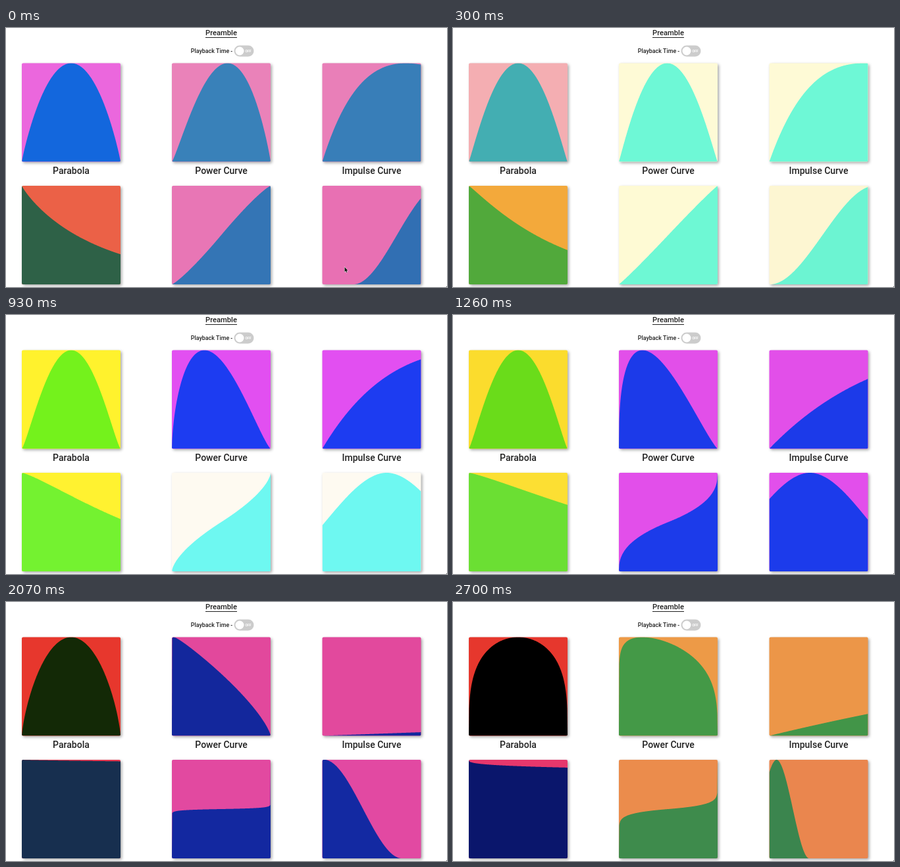
These frames come from a looping animation (670x394 px, 2730 ms). An HTML page with a canvas:

```html
<!DOCTYPE html>
<html lang="en">
<head>
<meta charset="utf-8">
<title>Shaping curves</title>
<style>
  html, body { margin: 0; width: 100%; height: 100%; overflow: hidden; background: #fff; }
  canvas { display: block; }
</style>
</head>
<body>
<canvas id="stage" width="670" height="394"></canvas>
<script>
const ctx = document.getElementById('stage').getContext('2d');
const LOOP = 2730, STEP = 30, SIZE = 150;
const { sin, cos, tan, pow, exp, abs, min, max } = Math;
const clamp = v => min(1, max(0, v));
const rgb = c => `rgb(${c.map(Math.round)})`;

// Shaping functions: x in 0..1, with two parameters a and b.
const parabola = (x, a, b) => pow(4 * x * (1 - x), b);
const power = (x, a, b) =>
  pow(a + b, a + b) / (pow(a, a) * pow(b, b)) * pow(x, a) * pow(1 - x, b);
const impulse = (x, a) => a * x * exp(1 - a * x);
const decay = (x, a, b) => exp(-a * pow(x, b));
const gain = (x, a) => {
  const half = 0.5 * pow(2 * min(x, 1 - x), a);
  return x < 0.5 ? half : 1 - half;
};
const pulse = (x, a, b) => {
  const d = min(1, abs(x - a) / b);
  return 1 - d * d * (3 - 2 * d);
};

// Palettes return [background, foreground] for a phase.
function warm(blue, greenFade) {
  return phase => {
    const s = clamp(sin(phase)), b = blue(phase);
    const g = max(242 * pow(s, 1.1), greenFade ? 0.2 * b : 0);
    const fade = greenFade ? 1 : 1 - pow(clamp(cos(phase)), 4);
    return [
      [230 + 25 * s * s, max(55, g), max(45, b)],
      [0.48 * g * fade, g, b]
    ];
  };
}
const sunset = warm(p => 235 * clamp(cos(p)) + 28 * clamp(sin(p)), false);
const forest = warm(p => 88 - 40 * sin(p), true);
const neon = phase => {
  const g = clamp(tan(phase));
  const b = 241 * pow((1 + sin(phase)) / 2, 0.85);
  return [
    [226 + 28 * g * g, max(60 + 0.08 * b, 250 * g), b],
    [max(0.12 * b, 110 * g), max(0.25 * b, 248 * g), b]
  ];
};

const panels = [
  { x: 24, y: 53.5, lag: 0, curve: parabola, palette: sunset, label: 'Parabola' },
  { x: 252, y: 53.5, lag: 0, curve: power, palette: neon, label: 'Power Curve' },
  { x: 480.5, y: 53.5, lag: 0.01, curve: impulse, palette: neon, label: 'Impulse Curve' },
  { x: 24, y: 240, lag: 0.03, curve: decay, palette: forest },
  { x: 252, y: 240, lag: 0.04, curve: gain, palette: neon },
  { x: 480.5, y: 240, lag: 0.06, curve: pulse, palette: neon }
];

function text(str, x, y, size, color = '#222', weight = 500) {
  ctx.font = `${weight} ${size}px Roboto, sans-serif`;
  ctx.textAlign = 'center';
  ctx.fillStyle = color;
  ctx.fillText(str, x, y);
}

function pill(x, y, w, h, r, color) {
  ctx.beginPath();
  ctx.roundRect(x, y, w, h, r);
  ctx.fillStyle = color;
  ctx.fill();
}

function drawPanel({ x, y, lag, curve, palette, label }, time) {
  const phase = 0.48 - lag + 1.19 * time;
  const a = 0.625 * (1 + cos(phase)), b = 0.625 * (1 + sin(phase));
  const [back, front] = palette(phase).map(rgb);

  ctx.save();
  ctx.shadowColor = 'rgba(0,0,0,.35)';
  ctx.shadowBlur = 4;
  ctx.shadowOffsetX = ctx.shadowOffsetY = 2;
  pill(x, y, SIZE, SIZE, 2, back);
  ctx.restore();

  ctx.save();
  ctx.clip();
  ctx.beginPath();
  ctx.moveTo(x, y + SIZE);
  for (let i = 0; i <= SIZE; i += 0.5) {
    ctx.lineTo(x + i, y + SIZE * (1 - clamp(curve(i / SIZE, a, b))));
  }
  ctx.lineTo(x + SIZE, y + SIZE);
  ctx.fillStyle = front;
  ctx.fill();
  ctx.restore();

  if (label) text(label, x + SIZE / 2, y + 168, 14);
}

function drawHeader() {
  text('Preamble', 327, 11, 11.2);
  ctx.fillRect(303, 14, 48, 1);
  text('Playback Time -', 312.5, 38, 8.9);
  pill(346.5, 26.5, 30, 17, 8.5, '#ccc');
  pill(348.5, 28.5, 13, 13, 6.5, '#fff');
  text('OFF', 368, 37, 5, '#fff', 700);
}

function drawCursor() {
  ctx.beginPath();
  [[514.5, 363.5], [514.5, 371], [516.2, 369.6], [517.3, 372], [518.4, 371.5], [517.4, 369.2], [519.3, 369]]
    .forEach(p => ctx.lineTo(...p));
  ctx.closePath();
  ctx.strokeStyle = '#fff';
  ctx.lineWidth = 1;
  ctx.stroke();
  ctx.fillStyle = '#111';
  ctx.fill();
}

function draw(now) {
  const ms = Math.floor((now % LOOP) / STEP) * STEP;
  ctx.fillStyle = '#fff';
  ctx.fillRect(0, 0, 670, 394);
  drawHeader();
  panels.forEach(panel => drawPanel(panel, ms / 1000));
  if (ms < 150) drawCursor();
  ctx.fillStyle = '#555';
  ctx.fillRect(669, 393, 1, 1);
}

const start = performance.now();
function tick() {
  draw(performance.now() - start);
  requestAnimationFrame(tick);
}
tick();
</script>
</body>
</html>
```
